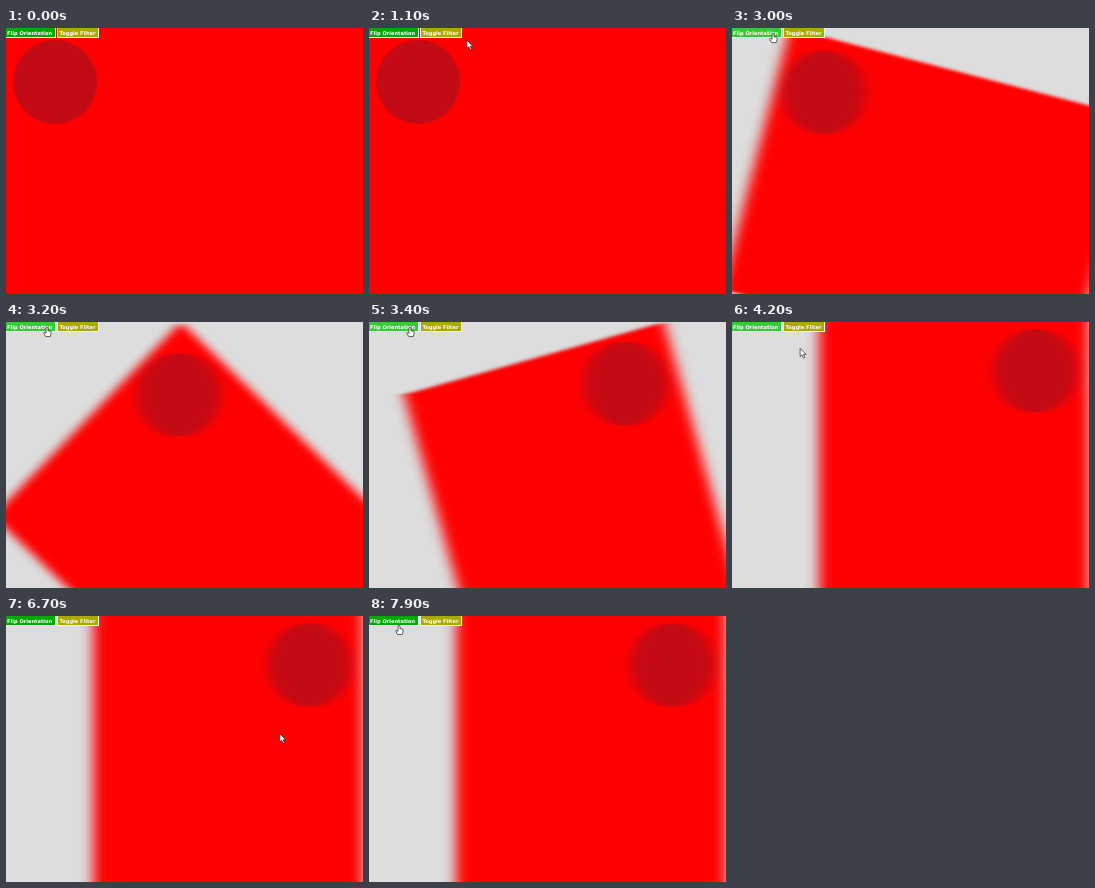
An HTML page that plays this animation: 357 by 266 pixels, repeating every 8 s.

```html
<!DOCTYPE html>
<html lang="en">
<head>
<meta charset="utf-8">
<title>Flip and filter</title>
<style>
html, body { margin: 0; width: 100%; height: 100%; overflow: hidden; background: #ddd; }
svg { display: block; width: 100vw; height: 100vh; }
text { font: bold 5.1px "DejaVu Sans", sans-serif; fill: #fff; }
</style>
</head>
<body>
<svg viewBox="0 0 357 266">
  <defs>
    <filter id="blur" filterUnits="userSpaceOnUse" x="-40" y="-40" width="440" height="450" color-interpolation-filters="sRGB">
      <feGaussianBlur stdDeviation="6.2 0"/>
    </filter>
  </defs>
  <rect width="357" height="266" fill="#ddd"/>
  <g id="scene">
    <g id="sheet">
      <rect width="357" height="270" fill="#f00"/>
      <circle cx="49" cy="54" r="42" fill="#c40a14"/>
    </g>
  </g>
  <rect width="50" height="10" fill="#eee"/>
  <rect id="flip" width="49" height="9"/>
  <text x="1" y="6.8">Flip Orientation</text>
  <rect x="51" width="42" height="10" fill="#eee"/>
  <rect id="toggle" x="52" width="40" height="9"/>
  <text x="53.5" y="6.8">Toggle Filter</text>
  <g id="cursor" fill="#fff" stroke="#222" stroke-width=".7" stroke-linejoin="round">
    <path id="arrow" d="M0 0V8.2L1.9 6.5 3.3 9.7 4.7 9.1 3.4 6H6Z"/>
    <path id="hand" d="M-1 1Q0-.6 1 1V4Q2 3.1 2.6 4.2 3.6 3.5 4 4.8V7L3.2 9.6H-1.2L-3.2 6.4Q-3.2 4.8-1.9 5.6L-1 6.4Z"/>
  </g>
</svg>
<script>
const LOOP = 8000, STEP = 100;
const entry = { x: 293, y: 34 };

// Each move runs from the previous resting place; sag bows it downwards.
const moves = [
  { start: 400, end: 1200, x: 70, y: 9 },
  { start: 2000, end: 2400, x: 41, y: 5 },
  { start: 4100, end: 5000, x: 285, y: 48, sag: 42 },
  { start: 5000, end: 5300, x: 278, y: 38 },
  { start: 5400, end: 6300, x: 287, y: 179 },
  { start: 6300, end: 7200, x: 257, y: 41 },
  { start: 7200, end: 7900, x: 30, y: 9 }
];

const el = id => document.getElementById(id);
const show = (id, on) => el(id).setAttribute("visibility", on ? "visible" : "hidden");
const between = (t, from, to) => t >= from && t < to;
const progress = (t, from, to) => Math.min(1, Math.max(0, (t - from) / (to - from)));
const easeInOut = p => p < .5 ? 2 * p * p : 1 - 2 * (1 - p) ** 2;

function pointer(t) {
  let { x, y } = entry;
  for (const { start, end, x: toX, y: toY, sag = 0 } of moves) {
    const k = progress(t, start, end);
    x += (toX - x) * k;
    y += (toY - y) * k + 4 * sag * k * (1 - k);
  }
  return { x, y };
}

function draw(t) {
  const turn = easeInOut(progress(t, 2730, 3680));
  el("sheet").setAttribute("transform", `translate(${357 * turn} 0) rotate(${90 * turn})`);
  el("scene").setAttribute("filter", t >= 1600 ? "url(#blur)" : "none");

  el("flip").setAttribute("fill", between(t, 2300, 4300) ? "#3c3" : "#0a0");
  el("toggle").setAttribute("fill", between(t, 1200, 2200) ? "#cc3" : "#aa0");

  const { x, y } = pointer(t);
  const onButton = x < 93 && y < 11;
  el("cursor").setAttribute("transform", `translate(${x} ${y})`);
  show("arrow", t >= 400 && !onButton);
  show("hand", t >= 400 && onButton);
}

const start = performance.now();
function frame() {
  const t = (performance.now() - start) % LOOP;
  draw(Math.floor(t / STEP) * STEP);
  requestAnimationFrame(frame);
}
frame();
</script>
</body>
</html>
```
